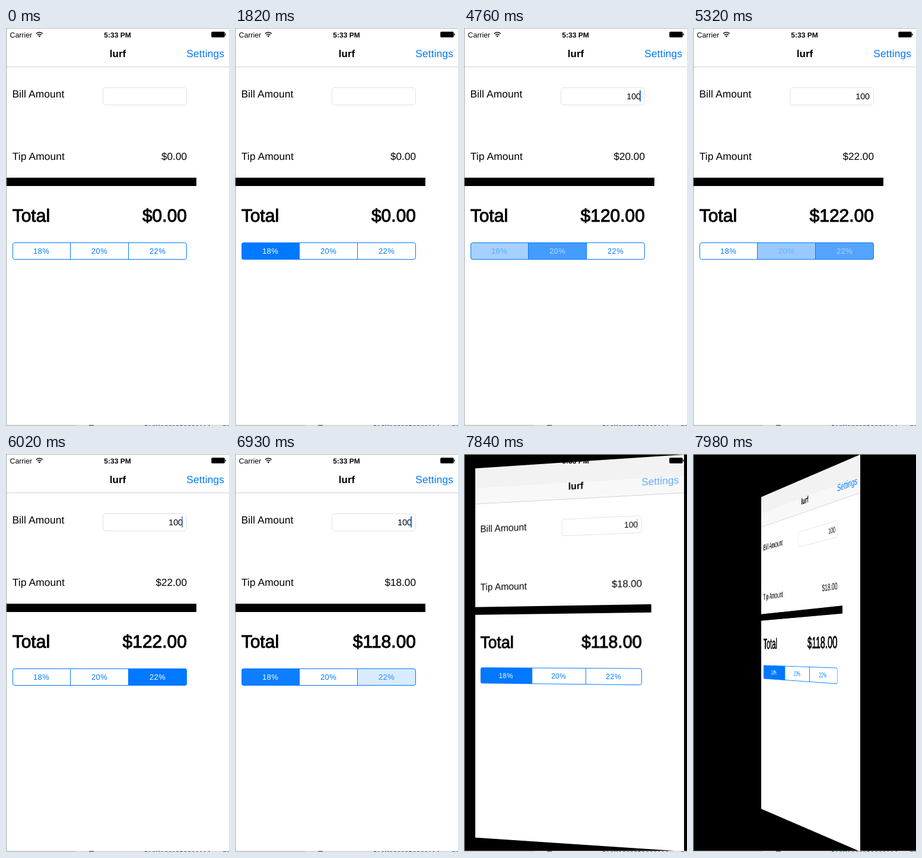
An HTML page that plays this animation: 376 by 670 pixels, repeating every 8000 ms.

```html
<!DOCTYPE html>
<html lang="en">
<head>
<meta charset="utf-8">
<title>Tip calculator</title>
<style>
  html, body { margin: 0; width: 100%; height: 100%; overflow: hidden; background: #000; }
  svg {
    position: absolute; left: 0; top: 0; width: 376px; height: 670px;
    font-family: "Liberation Sans", Arial, sans-serif;
    text-rendering: geometricPrecision;
  }
  #sheet { transform-origin: 188.5px 334.5px; }
  .body { font-size: 17.4px; letter-spacing: .1px; }
  .money { font-size: 17.2px; }
  .title { font-size: 17px; font-weight: bold; }
  .total { font-size: 30px; stroke: #000; stroke-width: 1px; }
  .small { font-size: 12.3px; }
  .clock { font-size: 12px; font-weight: bold; }
  .segment { font-size: 13px; letter-spacing: .4px; }
  .code { font: 11px "DejaVu Sans Mono", monospace; }
  .end { text-anchor: end; }
  .mid { text-anchor: middle; }
</style>
</head>
<body>
<svg id="sheet" viewBox="0 0 376 670">
  <clipPath id="pill"><rect x="11" y="361" width="294" height="29" rx="4"/></clipPath>
  <rect x="1" y="1" width="375" height="668" fill="#fff"/>
  <g id="bar" visibility="hidden">
    <rect x="1" y="1" width="375" height="64" fill="#f8f8f8"/>
    <rect x="1" y="1" width="375" height="36" fill="#f2f2f2"/>
  </g>
  <rect x="1" y="65" width="375" height="1" fill="#d0d0d0"/>
  <text class="title mid" x="188.5" y="49">lurf</text>
  <text class="body end" id="settings" x="368" y="49" fill="#0078ff">Settings</text>

  <text class="body" x="10.4" y="117">Bill Amount</text>
  <rect x="163.5" y="100.5" width="141" height="29" rx="4.5" fill="#fff" stroke="#e2e2e2"/>
  <text class="end" id="bill" x="298" y="120" font-size="14.2"></text>
  <rect id="caret" x="296" y="105" width="2" height="18.5" fill="#1a6ce8"/>

  <text class="body" x="10.7" y="222">Tip Amount</text>
  <text class="money end" id="tip" x="305" y="221.5"></text>
  <rect x="1" y="252" width="320" height="14"/>
  <text class="total" x="10.7" y="325.6">Total</text>
  <text class="total end" id="total" x="305" y="325.6"></text>

  <g id="segments" clip-path="url(#pill)"></g>
  <path d="M108.5 361v29M206.5 361v29" stroke="#0078ff"/>
  <rect x="11.5" y="361.5" width="293" height="28" rx="3.5" fill="none" stroke="#0078ff"/>
</svg>

<svg viewBox="0 0 376 670">
  <text class="small" x="6.5" y="15.5">Carrier</text>
  <path d="M50.8 9.6a7.6 7.6 0 0 1 11 0M52.9 11.8a4.8 4.8 0 0 1 6.8 0"
        fill="none" stroke="#000" stroke-width="1.5"/>
  <path d="M56.3 15.6l-1.9-2a2.7 2.7 0 0 1 3.8 0z"/>
  <text class="clock mid" x="188" y="15.5">5:33 PM</text>
  <rect x="346.5" y="6.5" width="22" height="9" rx="1.5" stroke="#000" stroke-opacity=".5"/>
  <rect x="369.3" y="9.3" width="1.4" height="3.4" rx=".7"/>

  <rect width="376" height="1" fill="#b8b8b8"/>
  <rect width="1" height="670" fill="#a6a6a6"/>
  <svg x="0" y="668" width="376" height="2" viewBox="0 668 376 2">
    <rect y="668" width="376" height="2" fill="#dcdcdc"/>
    <rect y="668" width="118" height="2" fill="#cacaca"/>
    <rect x="140" y="668" width="8" height="2" fill="#888"/>
    <text class="code" x="233" y="675" fill="#25586e">tipPercentages[i] = mo</text>
  </svg>
</svg>

<script>
const LOOP = 8000, TICK = 70;
const NS = "http://www.w3.org/2000/svg";
const $ = id => document.getElementById(id);
const clamp = x => Math.max(0, Math.min(1, x));

const percents = [18, 20, 22];
const keys = [2030, 2100, 2310];
const taps = [
  { time: 0, pick: 0, fade: 1 },
  { time: 4597, pick: 1, fade: 250 },
  { time: 5170, pick: 2, fade: 250 },
  { time: 6794, pick: 0, fade: 160 }
];
const focus = 840, leave = 7700;
const turn = { start: 7731, length: 642, depth: 1196 };

function add(parent, tag, attrs) {
  const el = document.createElementNS(NS, tag);
  for (const key in attrs) el.setAttribute(key, attrs[key]);
  return parent.appendChild(el);
}

const segments = percents.map((percent, i) => {
  const x = 11 + 98 * i;
  const fill = add($("segments"), "rect", { x, y: 361, width: 98, height: 29, fill: "#0078ff" });
  const text = add($("segments"), "text", { x: x + 48.5, y: 380.3, class: "segment mid" });
  text.textContent = percent + "%";
  return { fill, text };
});

// Solid after focus and typing, then a soft blink
function caretAlpha(t) {
  const shown = clamp((t - focus) / 140) * clamp((leave + 175 - t) / 140);
  const since = t - (t < keys[0] ? focus + 840 : keys[2] + 560);
  if (since < 0) return shown;
  const p = since % 1050;
  return shown * Math.max(clamp(.7 - p / 200), clamp((p - 420) / 140));
}

function drawSegments(t, now, last) {
  const k = clamp((t - now.time) / now.fade);
  segments.forEach(({ fill, text }, i) => {
    const a = i === now.pick ? Math.min(1, 1.12 * k) : i === last.pick ? 1 - k : 0;
    fill.setAttribute("opacity", a);
    text.setAttribute("fill", `rgb(${255 * a}, ${120 + 135 * a}, 255)`);
  });
}

// The near edge stays in the plane of the screen while the sheet turns
function drawTurn(t) {
  const x = clamp((t - turn.start) / turn.length);
  const angle = x * x * (3 - 2 * x) * Math.PI;
  const push = -187.5 * Math.sin(angle);
  $("bar").setAttribute("visibility", x ? "visible" : "hidden");
  $("sheet").style.transform = x
    ? `perspective(${turn.depth}px) translateZ(${push}px) rotateY(${-angle}rad)`
    : "none";
}

function draw(t) {
  const count = taps.filter(tap => tap.time <= t).length;
  const now = taps[count - 1], last = taps[Math.max(0, count - 2)];
  const bill = "100".slice(0, keys.filter(time => time <= t).length);
  const tip = bill * percents[now.pick] / 100;

  $("bill").textContent = bill;
  $("tip").textContent = "$" + tip.toFixed(2);
  $("total").textContent = "$" + (+bill + tip).toFixed(2);
  $("caret").setAttribute("opacity", caretAlpha(t));
  $("settings").setAttribute("opacity", t < leave ? 1 : clamp(.25 + (t - leave) / 373));
  drawSegments(t, now, last);
  drawTurn(t);
}

function frame() {
  const t = performance.now() % LOOP;
  draw(Math.floor(t / TICK) * TICK);
  requestAnimationFrame(frame);
}
frame();
</script>
</body>
</html>
```
